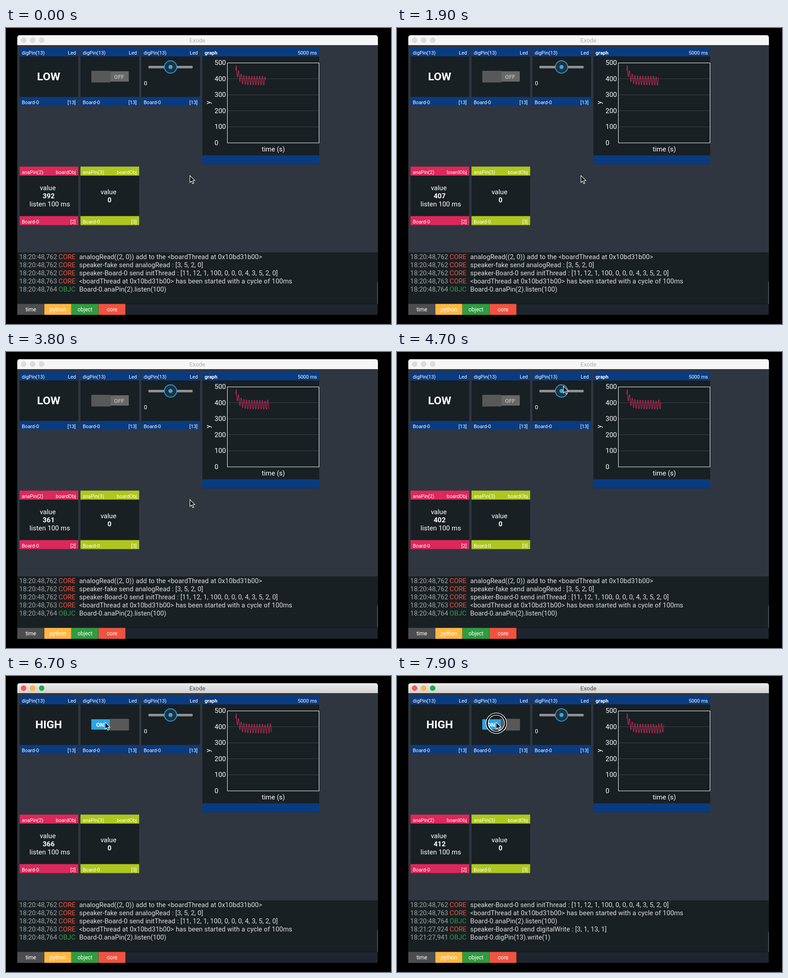
Recreate the animation shown at these times as an HTML page. Size 853x657 px, loop 8000 ms.

```html
<!DOCTYPE html>
<html lang="en">
<head>
<meta charset="utf-8">
<title>Exode</title>
<style>
html, body { margin: 0; width: 100%; height: 100%; overflow: hidden; background: #000; }
svg { display: block; width: 853px; height: 657px; font-family: Roboto, "Open Sans", sans-serif; }
text { white-space: pre; }
.log { word-spacing: .32px; }
</style>
</head>
<body>
<svg id="stage" viewBox="0 0 853 657">
  <defs>
    <linearGradient id="bar" x2="0" y2="1"><stop stop-color="#ececec"/><stop offset="1" stop-color="#d2d2d2"/></linearGradient>
  </defs>
</svg>
<script>
const LOOP = 8000;
const stage = document.getElementById('stage');

function add(tag, attrs, content) {
  const node = document.createElementNS('http://www.w3.org/2000/svg', tag);
  for (const key in attrs) node.setAttribute(key, attrs[key]);
  if (content !== undefined) node.textContent = content;
  return stage.appendChild(node);
}
const rect = (x, y, width, height, fill, more) => add('rect', { x, y, width, height, fill, ...more });
const circle = (cx, cy, r, fill, more) => add('circle', { cx, cy, r, fill, ...more });
const text = (s, x, y, size, fill = '#fff', more) => add('text', { x, y, 'font-size': size, fill, ...more }, s);
const mid = { 'text-anchor': 'middle' }, end = { 'text-anchor': 'end' }, bold = { 'font-weight': 700 };
const midBold = { ...mid, ...bold };

// Window
const titleBar = add('path', { d: 'M25 38V21a5 5 0 0 1 5-5H819a5 5 0 0 1 5 5V38Z' });
const lights = [39, 59, 79].map(x => circle(x, 27, 5.7, '#dcdcdc', { 'stroke-width': .6 }));
const title = text('Exode', 424, 32, 13, '#aaa', mid);
rect(25, 38, 799, 460, '#2f3640');
rect(25, 498, 799, 114, '#192024');
rect(25, 612, 799, 25, '#10161d');
rect(266, 613, 557, 23, '#1e252f');
[['time', '#4d4d4f'], ['python', '#ffb83f'], ['object', '#2f9c40'], ['core', '#f0533f']].forEach(([name, fill], i) => {
  rect(25 + 60 * i, 612.4, 59.7, 24.3, fill);
  text(name, 55 + 60 * i, 629, 12, '#fff', mid);
});

// Cards
function card(x, y, w, h, fill, head, kind, foot, pin, headStyle) {
  rect(x, y, w, h, '#182024');
  rect(x, y, w, 20, fill);
  rect(x, y + h - 20, w, 20, fill);
  text(head, x + 5, y + 16, 11, '#fff', headStyle);
  text(kind, x + w - 5, y + 16, 11, '#fff', end);
  text(foot, x + 5, y + h - 4, 11);
  text(pin, x + w - 5.5, y + h - 4, 11, '#fff', end);
}
const blue = '#093b80';
for (const x of [30, 165, 300]) card(x, 43, 130, 130, blue, 'digPin(13)', 'Led', 'Board-0', '[13]');
card(435, 43, 259, 259.5, blue, 'graph', '5000 ms', '', '', bold);
card(30, 307.6, 130, 129.9, '#dc285b', 'anaPin(2)', 'boardObj', 'Board-0', '[2]');
card(165, 307.6, 130, 129.9, '#adc71f', 'anaPin(3)', 'boardObj', 'Board-0', '[3]');

const level = text('LOW', 94.5, 116, 24.8, '#fff', midBold);
text('value', 92.5, 359.5, 15, '#fff', mid);
const reading = text('', 94.5, 377.5, 15.3, '#fff', midBold);
text('listen 100 ms', 97, 395.5, 15, '#fff', mid);
text('value', 227, 368.5, 15, '#fff', mid);
text('0', 229.3, 386.5, 15, '#fff', midBold);

// Switch
rect(189, 96, 42, 23, '#2ca4e4', { rx: 1 });
rect(230, 96, 42, 23, '#686868', { rx: 1 });
text('ON', 208.5, 112.5, 12.5, '#fff', midBold);
text('OFF', 250.5, 112.5, 12.5, '#b0b0b0', midBold);
const knob = rect(189, 95, 42.5, 26, '#585858', { rx: 1.5 });

// Slider
rect(315.5, 84, 98, 5.5, '#929292', { rx: 1.5 });
circle(364.5, 86.5, 13.7, '#20323e', { stroke: '#3099d8', 'stroke-width': 1.9 });
circle(364.5, 86.5, 4.6, '#34a8e8');
text('0', 305.5, 127, 13);

// Graph
const plotY = v => 255 - v * .356;
for (let v = 0; v <= 500; v += 100) {
  text(v, 462, plotY(v) + 4.9, 15);
  if (v && v < 500) rect(491, Math.floor(plotY(v)), 203, 1, '#3b4347');
}
const trace = add('path', { fill: 'none', stroke: '#d42a5c', 'stroke-width': 1.1, 'stroke-linejoin': 'round' });
rect(490.5, 77.5, 203, 177.5, 'none', { stroke: '#fff' });
text('time (s)', 592.3, 273.5, 15, '#fff', mid);
text('y', 0, 0, 15, '#fff', { ...mid, transform: 'translate(453 165.5) rotate(-90)' });

// Log
const log = [
  ['18:20:48,762', 'CORE', 'analogRead((2, 0)) add to the <boardThread at 0x10bd31b00>'],
  ['18:20:48,762', 'CORE', 'speaker-fake send analogRead : [3, 5, 2, 0]'],
  ['18:20:48,762', 'CORE', 'speaker-Board-0 send initThread : [11, 12, 1, 100, 0, 0, 0, 4, 3, 5, 2, 0]'],
  ['18:20:48,763', 'CORE', '<boardThread at 0x10bd31b00> has been started with a cycle of 100ms'],
  ['18:20:48,764', 'OBJC', 'Board-0.anaPin(2).listen(100)'],
  ['18:21:27,924', 'CORE', 'speaker-Board-0 send digitalWrite : [3, 1, 13, 1]'],
  ['18:21:27,941', 'OBJC', 'Board-0.digPin(13).write(1)']
];
const rows = [0, 1, 2, 3, 4].map(i => {
  const y = 513.3 + 18 * i;
  return [
    text('', 29.3, y, 14.65, '#a0a3a5'),
    text('', 116.5, y, 14.9),
    text('', 162.3, y, 14.73, '#dcdddd', { class: 'log' })
  ];
});
const scroll = rect(822.5, 563, 1.5, 49, '#596168');

// Pointer
const ring = [[5.8, '#fff'], [3.2, '#000']].map(([w, stroke]) =>
  circle(220, 104.7, 20.4, 'none', { stroke, 'stroke-width': w }));
const pointer = add('path', {
  d: 'M0 0V15.5L3.6 12.2L6.2 18L8.7 16.9L6.2 11.2H11Z',
  fill: '#111', stroke: '#fff', 'stroke-width': 1.1
});

// Linear interpolation through [time, value] pairs
function lerp(keys, t) {
  const i = keys.findIndex(k => k[0] > t);
  if (i < 0) return keys[keys.length - 1][1];
  if (!i) return keys[0][1];
  const [t0, a] = keys[i - 1], [t1, b] = keys[i];
  return a + (b - a) * (t - t0) / (t1 - t0);
}
const ease = p => p * p * (3 - 2 * p);
const clamp = p => Math.max(0, Math.min(1, p));

// Sensor: steady wave, a slow wander, and a decaying start
const SPEED = 2.03, NOW_X = 575.2;
const wave = t => 388.5 + 28 * Math.cos(2 * Math.PI * (t - 5.25) / 2.9);
const wander = [[0, 392], [1.9, 407], [3.8, 361], [4.7, 402], [5.8, 402], [6.7, 366], [7.9, 412]]
  .map(([t, v]) => [t, v - wave(t)]);
wander.unshift([-2, 0]);
const sensor = t => wave(t) + lerp(wander, t);

function tracePath(t) {
  let d = 'M508.8 94';
  const last = NOW_X + SPEED * t;
  for (let x = 510; x <= last; x += .4) {
    const v = sensor((x - NOW_X) / SPEED) + 74 * Math.exp((510 - x) / 6.5);
    d += `L${x.toFixed(1)} ${plotY(v).toFixed(1)}`;
  }
  return d + `L${last} ${plotY(sensor(t))}`;
}

const pauses = [3, 13, 29, 35, 57];
const clicks = [[5.4, 5.6], [6, 6.3], [7.7, 8]];

function draw(ms) {
  let step = Math.floor(ms / 100);
  if (pauses.includes(step)) step--;
  const t = step / 10;

  const active = t >= 5.5;
  titleBar.setAttribute('fill', active ? 'url(#bar)' : '#f6f6f6');
  title.setAttribute('fill', active ? '#484848' : '#b0b0b0');
  lights.forEach((light, i) => {
    light.setAttribute('fill', active ? ['#fc5b50', '#fdb840', '#18b04c'][i] : '#dcdcdc');
    light.setAttribute('stroke', active ? ['#df4744', '#de9f34', '#149a40'][i] : '#cfcfcf');
  });

  reading.textContent = Math.round(sensor(t));
  trace.setAttribute('d', tracePath(t));

  const slide = clamp((t - 6.2) / .2);
  knob.setAttribute('x', 189 + 41 * slide * (2 - slide));
  level.textContent = t >= 6.3 ? 'HIGH' : 'LOW';

  const first = t >= 7.1 ? 2 : 0;
  rows.forEach((row, i) => {
    row.forEach((cell, j) => cell.textContent = log[first + i][j]);
    row[1].setAttribute('fill', log[first + i][1] === 'CORE' ? '#f0533f' : '#2f9c40');
  });
  scroll.setAttribute('y', 563 + 3 * first);
  scroll.setAttribute('height', 49 - 3 * first);

  const a = ease(clamp((t - 3.9) / .7)), b = ease(clamp((t - 4.8) / .6));
  pointer.setAttribute('transform', `translate(${407.5 - 39 * a - 149 * b} ${327.5 - 252 * a + 27 * b})`);
  const pressed = clicks.some(([from, to]) => t >= from && t < to);
  ring.forEach(r => r.setAttribute('visibility', pressed ? 'visible' : 'hidden'));
}

const start = performance.now();
function frame() {
  draw((performance.now() - start) % LOOP);
  requestAnimationFrame(frame);
}
frame();
</script>
</body>
</html>
```
